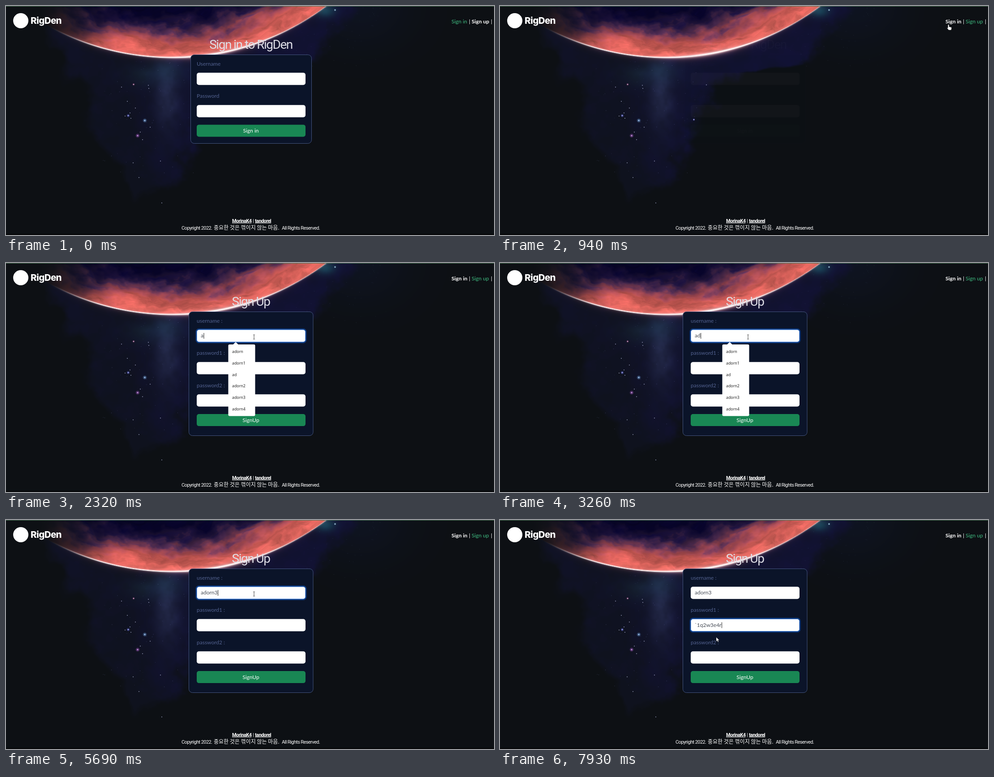
Recreate the animation shown at these times as an HTML page with a canvas. Size 1090 px wide and 514 px high, loop 8 s.

```html
<!DOCTYPE html>
<html lang="en">
<head>
<meta charset="utf-8">
<title>Sign up</title>
<style>
html, body { margin: 0; width: 100%; height: 100%; overflow: hidden; background: #0d1014; }
canvas, svg { position: absolute; left: 0; top: 0; }
text { font: 12px Lato, sans-serif; fill: #fff; white-space: pre; }
.brand { font: 800 20.5px Inter, sans-serif; letter-spacing: -.6px; }
.title { font: 28px Roboto, sans-serif; letter-spacing: -1.5px; fill: #dedee6; text-anchor: middle; }
.label { fill: #536290; }
.typed { fill: #454b55; }
.button { text-anchor: middle; }
.foot { font: 11px Roboto, sans-serif; letter-spacing: -.6px; }
.hangul { font: 12px "Noto Sans CJK KR", "Noto Sans CJK", sans-serif; }
.link { font-weight: 700; text-decoration: underline; }
.item { font: 8.8px "Noto Sans", sans-serif; fill: #222; }
.status { font: 8.6px Roboto, sans-serif; fill: #173017; }
.here { fill: #3fbd82; }
.there { font-weight: 700; }
</style>
</head>
<body>
<canvas id="sky" width="1090" height="514"></canvas>
<svg id="page" width="1090" height="514" viewBox="0 0 1090 514"></svg>
<script>
const W = 1090, H = 514;
const clamp = v => Math.min(1, Math.max(0, v));
const smooth = (a, b, v) => { const k = clamp((v - a) / (b - a)); return k * k * (3 - 2 * k); };
const mix = (a, b, k) => a.map((v, i) => v + (b[i] - v) * k);
const add = (a, b, k) => a.map((v, i) => v + b[i] * k);

// Linear interpolation through points [key, ...values]
function along(points, key) {
  let i = 0;
  while (i < points.length - 2 && key > points[i + 1][0]) i++;
  const [a, b] = [points[i], points[i + 1]];
  return mix(a, b, clamp((key - a[0]) / (b[0] - a[0]))).slice(1);
}

/* ---------- background ---------- */
function hash(x, y) {
  let h = Math.imul(x, 374761393) + Math.imul(y, 668265263) | 0;
  h = Math.imul(h ^ h >>> 13, 1274126177);
  return ((h ^ h >>> 16) >>> 0) / 2 ** 32;
}
function noise(x, y) {
  const i = Math.floor(x), j = Math.floor(y);
  let u = x - i, v = y - j;
  u *= u * (3 - 2 * u);
  v *= v * (3 - 2 * v);
  const top = hash(i, j) * (1 - u) + hash(i + 1, j) * u;
  const low = hash(i, j + 1) * (1 - u) + hash(i + 1, j + 1) * u;
  return top * (1 - v) + low * v;
}
function fbm(x, y) {
  let sum = 0;
  for (let k = 0, amp = .53; k < 4; k++, amp /= 2, x = x * 2 + 7, y = y * 2 + 3) sum += noise(x, y) * amp;
  return sum;
}
const blob = (x, y, cx, cy, rx, ry) => Math.exp(-(((x - cx) / rx) ** 2) - ((y - cy) / ry) ** 2);

const NIGHT = [13, 16, 20];
const SURFACE = [[0, 222, 102, 92], [.45, 204, 90, 85], [.75, 150, 68, 82], [1, 76, 42, 76],
  [1.25, 30, 19, 58], [1.6, 7, 4, 40]];
const LEFT = [[0, 60], [100, 125], [200, 165], [270, 155], [310, 200], [360, 248], [445, 285]];
const RIGHT = [[0, 790], [40, 750], [90, 715], [130, 680], [150, 540], [180, 490], [250, 445],
  [310, 433], [390, 395], [445, 295]];

function planet(x, y, depth) {
  const arc = Math.atan2(x - 370, y + 460) * 575;
  const warp = fbm(arc / 45, depth / 30);
  const swirl = fbm(arc / 32 + warp * 3, depth / 9 + warp * 4);
  const level = depth / 62 + (warp - .5) * .8 + (swirl - .5) * .5 + .65 * smooth(290, 110, x);
  const color = along(SURFACE, level).map(v => v * (.7 + swirl * .6));
  return mix(NIGHT, color, smooth(70, 260, x + depth * .25));
}

function nebula(x, y, left, right) {
  let color = add(NIGHT, [1, 3, 12], blob(x, y, 790, 0, 110, 90));
  if (y < 470 && x > left - 70 && x < right + 70) {
    const n = fbm(x / 60, y / 60), m = fbm(x / 38 + 50, y / 38);
    const shade = Math.round(clamp((m - .3) * 2) * 5) / 5;
    const mask = smooth(-12, 22, x - left + (n - .5) * 90) * smooth(-15, 40, right - x + (m - .5) * 80)
      * smooth(465, 415, y);
    const blue = shade * .35 + smooth(260, 420, x) * .6 - smooth(300, 420, y) * .2;
    let cloud = mix([15, 18, 30], [18, 18, 54], clamp(blue));
    cloud = add(cloud, [26, 32, 40], blob(x, y, 362, 205, 26, 70) * m * 1.2);
    cloud = add(cloud, [10, 24, 26], blob(x, y, 340, 145, 60, 28) * n * 1.4);
    color = mix(color, cloud, mask);
  }
  return add(color, [8, 48, 42], blob(x, y, 712, 10, 22, 14));
}

function paintSky() {
  const ctx = sky.getContext("2d"), image = ctx.createImageData(W, H);
  for (let y = 0, p = 0; y < H; y++) {
    const [left] = along(LEFT, y), [right] = along(RIGHT, y);
    for (let x = 0; x < W; x++) {
      const depth = 575 - Math.hypot(x - 370, y + 460);
      let color = depth > 0 && x > 20 ? planet(x, y, depth) : nebula(x, y, left, right);
      if (Math.abs(depth) < 30) {
        const edge = smooth(90, 230, x) * (1 - .6 * smooth(540, 700, x));
        const hot = Math.exp(-(((x - 465) / 95) ** 2));
        color = mix(color, [255, 140, 150], Math.exp(-Math.abs(depth) / 5) * edge * (.2 + hot * .5));
        color = mix(color, [255, 244, 244], clamp(1.7 * Math.exp(-Math.abs(depth) / (.9 + hot))) * edge);
      }
      image.data.set([...color, 255], p);
      p += 4;
    }
  }
  ctx.putImageData(image, 0, 0);

  const dot = (x, y, r, fill) => {
    ctx.fillStyle = fill;
    ctx.fillRect(x - r, y - r, 2 * r, 2 * r);
  };
  for (let i = 0; i < 70; i++) {
    const y = 120 + hash(i, 1) * 260;
    dot(210 + hash(i, 2) * 230, y, .5, `rgba(150,160,230,${.1 + hash(i, 3) * .3})`);
    dot(640 + hash(i, 4) * 220, hash(i, 5) * 140, .5, `rgba(120,150,180,${hash(i, 6) * .25})`);
  }
  for (const [x, y] of [[322, 272], [297, 385], [348, 442], [345, 348], [258, 182], [318, 178], [271, 214],
    [277, 240], [279, 252], [461, 177], [284, 352], [305, 300], [300, 283], [266, 247], [289, 229], [319, 185]])
    dot(x, y, .7, "#c8cdf0");
  for (const [x, y, r, tint] of [[285, 176, 3, "200,90,150"], [273, 246, 4, "110,120,255"], [310, 257, 5, "130,190,255"],
    [294, 291, 5, "190,100,220"], [433, 255, 3, "120,120,240"], [735, 9, 3, "130,200,220"]]) {
    const glow = ctx.createRadialGradient(x, y, 0, x, y, r);
    glow.addColorStop(0, `rgba(${tint},.8)`);
    glow.addColorStop(1, `rgba(${tint},0)`);
    dot(x, y, r, glow);
    dot(x, y, .8, "#eef");
  }
  ctx.fillStyle = "#4d7a58";
  ctx.fillRect(0, 0, W, 1);
  ctx.fillStyle = "#07090b";
  ctx.fillRect(0, 511, W, 3);
}

/* ---------- page ---------- */
const text = (cls, x, y, s, extra = "") => `<text class="${cls}" x="${x}" y="${y}" ${extra}>${s}</text>`;
const rect = (x, y, w, h, r, fill, extra = "") =>
  `<rect x="${x}" y="${y}" width="${w}" height="${h}" rx="${r}" fill="${fill}" ${extra}/>`;

const ROWS = [150, 222.5, 295];
const field = y => rect(426, y - .3, 243, 27.5, 5, "#fff");

function form(opacity, title, x, w, h, labels, button) {
  if (!opacity) return "";
  const y = ROWS[0] + labels.length * 72.7 - 29;
  return `<g opacity="${opacity}">` + text("title", 547, 96, title)
    + rect(x, 109.5, w, h, 8, "#0b1429", 'stroke="#44557f"')
    + labels.map((s, i) => text("label", 426, ROWS[i] - 16.5, s) + field(ROWS[i])).join("")
    + rect(426, y, 243, 27, 5, "#198754") + text("button", 547, y + 17.5, button) + "</g>";
}

function popup(top, width, items) {
  const x = 496.5, h = items.length * 25.7 + 6.5;
  return rect(x, top, width, h, 3, "#fff") + `<path d="M507 ${top + .5}l6-6 6 6z" fill="#fff"/>`
    + items.map((s, i) => text("item", 505, top + 19.3 + i * 25.7, s)).join("");
}

const CURSORS = {
  hand: '<path d="M0 0q1.5-1 2 .6v4l4.500 1q1.500.5 1.200 2.400l-1 4h-5.500l-3.700-4.500q.4-1.500 2 0v-6.500z" fill="#fff" stroke="#222" stroke-width=".5"/>',
  arrow: '<path d="M0 0v9.500l2.200-2 1.600 3.500 1.600-.7-1.600-3.400h3z" fill="#fff" stroke="#222" stroke-width=".5"/>',
  beam: '<path d="M-2-5h1.500l.5.5.5-.5h1.500M0-4.500v9M-2 5h1.500l.5-.5.500.5h1.500" fill="none" stroke="#444"/>'
};
const PATH = [[200, 1056, 42], [630, 1056, 42], [840, 1001, 42], [1365, 554, 166], [5690, 554, 166],
  [6240, 505, 328], [6615, 505, 328], [6720, 492, 245], [7770, 492, 245], [7875, 483, 263]];

function cursor(q) {
  const [x, y] = along(PATH, q);
  const inField = x > 426 && x < 669 && ROWS.some(r => y >= r && y <= r + 27);
  const kind = x > 990 ? "hand" : inField ? "beam" : "arrow";
  return `<g transform="translate(${x} ${y})">${CURSORS[kind]}</g>`;
}

// [time, name, password, focused row (-1 none), popup width, caret hidden]
const USERS = ["adorn", "adorn1", "ad", "adorn2", "adorn3", "adorn4"];
const KEY = "`1q2w3e4r";
const STATES = [
  [0, "", "", -1], [1690, "", "", 0], [1900, "", "", 0, 112],
  [2220, "a", "", 0, 60], [2420, "ad", "", 0, 60],
  [2850, "ado", "", 0, 60], [2950, "ador", "", 0, 60], [3050, "adorn", "", 0, 60],
  [3260, "ad", "", 0, 60], [3570, "ado", "", 0, 60], [3670, "ador", "", 0, 60], [3780, "adorn", "", 0, 60],
  [4210, "adorn", "", 1], [4730, "adorn", "", 1, 0, 1], [5270, "adorn", "", 0, 60],
  [5580, "adorn3", "", 0], [5900, "adorn3", "", 1],
  ...[[6670, 1], [6990, 3], [7200, 5], [7410, 6], [7510, 7], [7720, 8]].map(([t, n]) => [t, "adorn3", KEY.slice(0, n), 1, 69]),
  [7830, "adorn3", KEY, 1]
];

function entry(t) {
  const [, name, pass, row, width, noCaret] = STATES.findLast(s => s[0] <= t);
  const since = STATES.findLast((s, i) => s[0] <= t && (!i || STATES[i - 1][3] !== s[3]))[0];
  let out = "";
  if (row >= 0) {
    const glow = t - since < 100 ? .5 : 1;
    out += rect(425, ROWS[row] - 1.5, 245, 30, 6, "none", `stroke="#0d4fb0" stroke-width="3" opacity="${glow * .65}"`)
      + rect(426.5, ROWS[row], 242, 27, 5, "#fff", 'stroke="#6ea3f5" stroke-width=".8"');
  }
  out += [name, pass].map((s, i) => text("typed", 435, ROWS[i] + 17, s, `id="row${i}"`)).join("");
  if (row >= 0 && !noCaret) out += rect(435, ROWS[row] + 7, 1, 13, 0, "#222", `id="caret" data-row="${row}"`);
  if (width) out += popup(ROWS[row] + 32.8, width, row ? [KEY] : USERS.filter(u => u.startsWith(name)));
  return out;
}

const HEADER = '<circle cx="33" cy="33" r="17" fill="#fff"/>' + text("brand", 55, 40, "RigDen");
const FOOTER = text("foot link", 505, 485.5, "MorinaK4") + text("foot", 551, 485.5, "|")
  + text("foot link", 556, 485.5, "tandorel") + text("foot", 392, 502, "Copyright 2022.")
  + text("hangul", 464, 502, "중요한 것은 꺾이지 않는 마음.") + text("foot", 616, 502, "All Rights Reserved.");

function scene(t) {
  const q = Math.floor((t + 2) / 105) * 105;
  const up = t >= 310;
  return HEADER
    + text(up ? "there" : "here", 995, 39, "Sign in") + text("", 1034, 39, "|")
    + text(up ? "here" : "there", 1040, 39, "Sign up") + text("", 1083, 39, "|")
    + form(clamp(1 - (q - 310) / 540), "Sign in to RigDen", 412.5, 270, 199, ["Username", "Password"], "Sign in")
    + form(clamp((q - 945) / 420), "Sign Up", 408.5, 277.5, 278, ["username :", "password1 :", "password2 :"], "SignUp")
    + FOOTER
    + (t >= 200 && t < 940 ? rect(-4, 499, 97, 19, 3, "#74b874") + text("status", 3, 510, "localhost:8080/signup") : "")
    + entry(t) + (t >= 200 ? cursor(q) : "");
}

let shown = "";
function frame() {
  const next = scene(performance.now() % 8000);
  if (next !== shown) {
    page.innerHTML = shown = next;
    const mark = document.getElementById("caret");
    if (mark) {
      const typed = document.getElementById("row" + mark.dataset.row);
      mark.setAttribute("x", 435.5 + typed.getComputedTextLength());
    }
  }
  requestAnimationFrame(frame);
}

paintSky();
frame();
</script>
</body>
</html>
```
